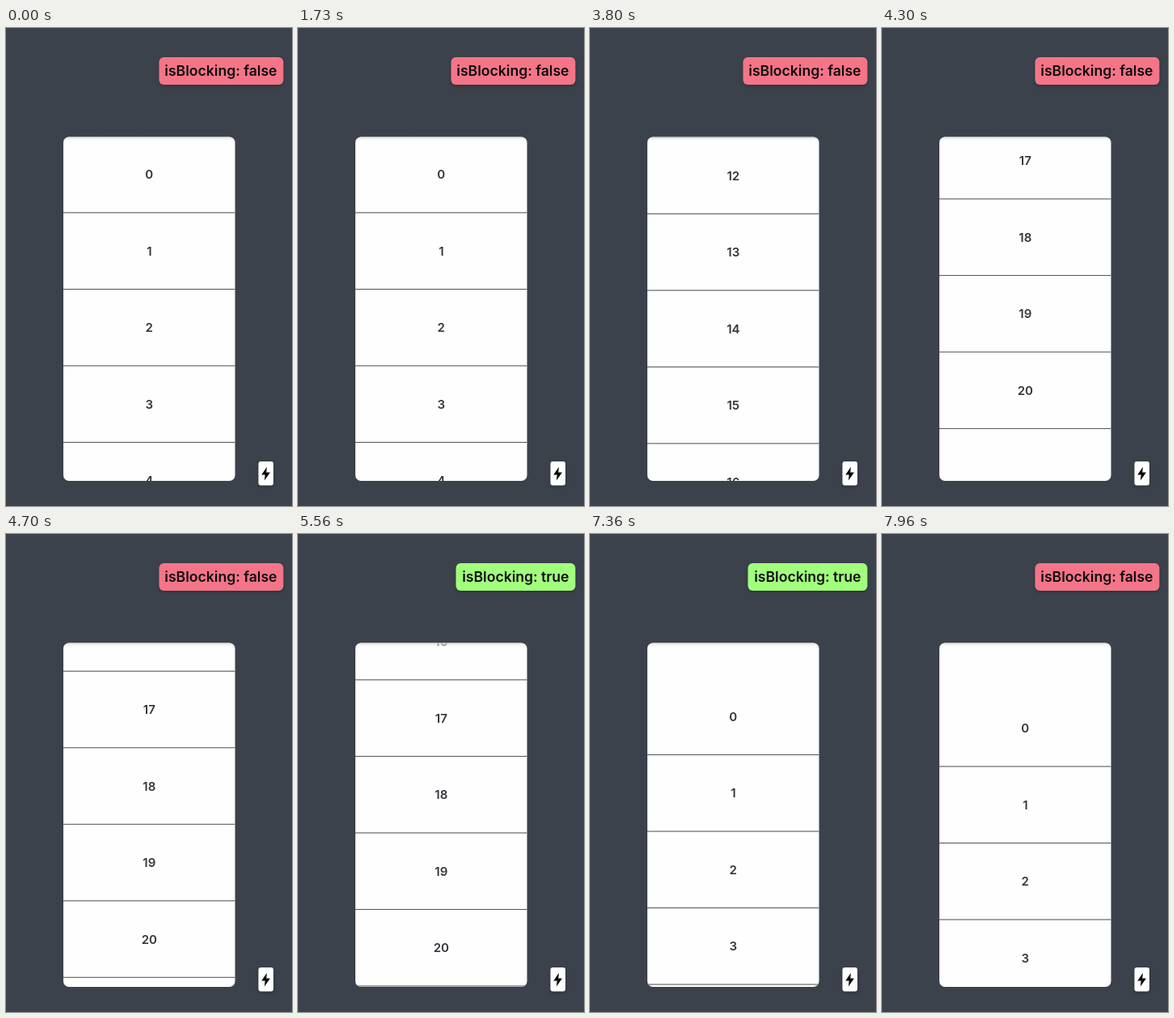
An HTML page for the animation above (8 s loop, 354 by 590 pixels).

```html
<!DOCTYPE html>
<html lang="en">
<head>
<meta charset="utf-8">
<title>Blocking list</title>
<style>
  html, body { margin: 0; width: 100%; height: 100%; overflow: hidden; background: #3b424b; }
  svg { display: block; width: 100vw; height: 100vh; }
  text { font-family: Inter, Roboto, sans-serif; font-weight: 600; }
  #rows text { font-size: 15px; fill: #35353c; text-anchor: middle; }
  #rows rect { fill: #5c5c62; }
  #label { font-size: 17.6px; fill: #100c10; text-anchor: end; }
</style>
</head>
<body>
<svg viewBox="0 0 354 590">
  <defs>
    <clipPath id="card"><rect x="71" y="134.5" width="212.5" height="424.5" rx="7"/></clipPath>
    <linearGradient id="shade" x2="0" y2="1">
      <stop offset="0" stop-color="#d4d4d8"/>
      <stop offset="1" stop-color="#fefefe" stop-opacity="0"/>
    </linearGradient>
    <filter id="shadow" x="-50%" y="-50%" width="200%" height="200%">
      <feDropShadow dx="0" dy="1.5" stdDeviation="2" flood-color="#000" flood-opacity=".28"/>
    </filter>
  </defs>
  <rect width="354" height="590" fill="#3b424b"/>
  <g clip-path="url(#card)">
    <rect x="71" y="134" width="213" height="426" fill="#fefefe"/>
    <g id="rows"></g>
    <rect x="71" y="134" width="213" height="6" fill="url(#shade)"/>
  </g>
  <rect id="pill" y="36" height="34" rx="6" filter="url(#shadow)"/>
  <text id="label" x="335.5" y="59"></text>
  <rect x="312.5" y="535" width="18.5" height="29.5" rx="3" fill="#fff" filter="url(#shadow)"/>
  <path d="M322.9 541.8 L316.2 551.6 H320.6 L319.9 558.6 L327 548.4 H322.3 Z" fill="#0b0b0b"/>
</svg>
<script>
const LOOP = 8000, ROW = 94.5, COUNT = 21, TOP = 134;
const BLOCK = [5000, 7930];

// [time, scroll offset]; overshoots past both ends of the list
const scroll = [
  [0, 0], [2800, 0], [3050, 120], [3300, 423.5], [3700, 980], [4080, 1520],
  [4220, 1615], [4300, 1623.5], [4600, 1580], [4900, 1560], [6580, 1560],
  [6800, 1250], [7000, 700], [7200, 120], [7300, -20], [7360, -44.5],
  [7960, -59], [8000, -59]
];

const get = id => document.getElementById(id);
const rows = get('rows'), pill = get('pill'), label = get('label');

function add(tag, attrs, text = '') {
  const el = document.createElementNS('http://www.w3.org/2000/svg', tag);
  for (const k in attrs) el.setAttribute(k, attrs[k]);
  el.textContent = text;
  rows.append(el);
}

for (let i = 0; i < COUNT; i++) {
  const y = TOP + i * ROW;
  add('text', { x: 177.3, y: y + 52.4 }, i);
  add('rect', { x: 71, y: y + 93.4, width: 213, height: 1.1 });
}

// Monotone cubic through the scroll points
const slope = i => (scroll[i + 1][1] - scroll[i][1]) / (scroll[i + 1][0] - scroll[i][0]);
const tangents = scroll.map((_, i) => {
  if (!i || i === scroll.length - 1) return 0;
  const a = slope(i - 1), b = slope(i);
  return a * b <= 0 ? 0 : 2 * a * b / (a + b);
});

function offset(t) {
  let i = 0;
  while (i < scroll.length - 2 && t >= scroll[i + 1][0]) i++;
  const [t0, a] = scroll[i], [t1, b] = scroll[i + 1];
  const d = t1 - t0, u = (t - t0) / d, v = 1 - u;
  return v * v * (1 + 2 * u) * a + u * u * (3 - 2 * u) * b
    + d * u * v * (v * tangents[i] - u * tangents[i + 1]);
}

function draw(t) {
  rows.setAttribute('transform', `translate(0 ${-offset(t)})`);
  const on = t >= BLOCK[0] && t < BLOCK[1];
  const x = on ? 195.5 : 189.5;
  pill.setAttribute('x', x);
  pill.setAttribute('width', 343.3 - x);
  pill.setAttribute('fill', on ? '#a1ff7c' : '#f47587');
  label.textContent = `isBlocking: ${on}`;
}

const start = performance.now();
function tick() {
  draw((performance.now() - start) % LOOP);
  requestAnimationFrame(tick);
}
tick();
</script>
</body>
</html>
```
